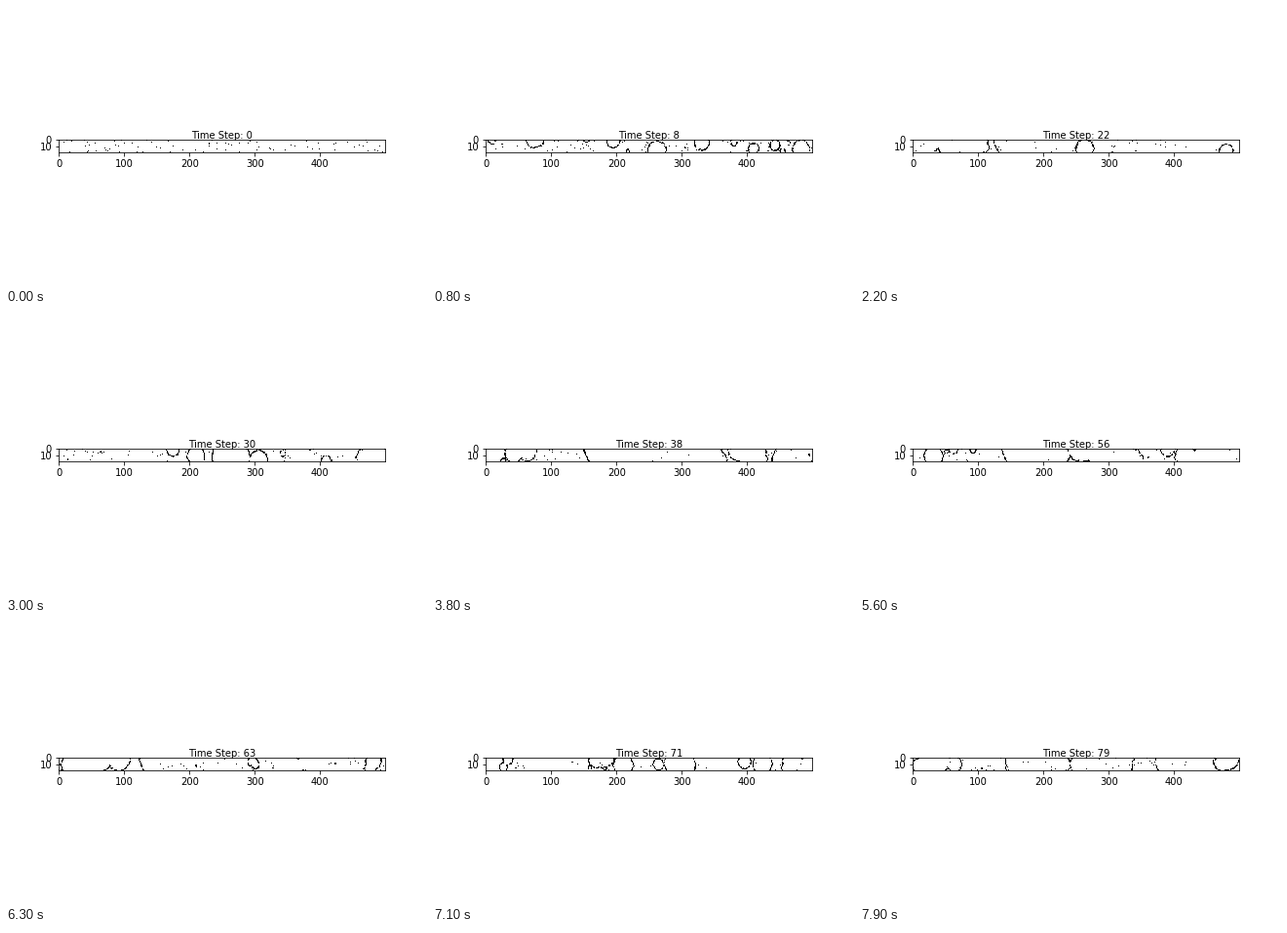
A matplotlib script for the animation above (8 s loop, 432x288 px).

```python
import matplotlib.pyplot as plt
import numpy as np
from matplotlib.animation import FuncAnimation

ROWS, COLS, STEPS = 20, 500, 80
REST = 10          # steps a cell stays quiet after firing
REACH = 2          # a cell senses the square this far around it
THRESHOLD = 3      # neighbours in the front needed to join it
P_FIRE = 0.016     # chance that a rested cell fires alone
TRIES = 2          # places tried per step for a new wave


def count_near(front):
    """Number of front cells in the square around each cell."""
    pad = np.pad(front.astype(int), REACH)
    size = 2 * REACH + 1
    return sum(pad[dy:dy + ROWS, dx:dx + COLS]
               for dy in range(size) for dx in range(size))


def simulate():
    """Excitable medium: lone sparks, plus rings growing from small nuclei."""
    rng = np.random.default_rng(7)
    last = np.full((ROWS, COLS), -REST - 1)
    front = np.zeros((ROWS, COLS), bool)
    history = []
    for step in range(STEPS):
        rested = step - last > REST
        front = rested & (count_near(front) >= THRESHOLD)
        if step > 0:
            for _ in range(TRIES):
                y, x = rng.integers(ROWS), rng.integers(COLS)
                nucleus = np.s_[max(y - 1, 0):y + 2, max(x - 1, 0):x + 2]
                front[nucleus] |= rested[nucleus]
        sparks = rested & (rng.random(front.shape) < P_FIRE)
        fired = front | sparks
        last[fired] = step
        history.append(fired)
    return history


history = simulate()

plt.rcParams.update({"font.family": "DejaVu Sans", "font.size": 10,
                     "text.kerning_factor": 6})
fig = plt.figure(figsize=(6, 4), dpi=72, facecolor="white")
fig.subplots_adjust(left=0.125, right=0.9, bottom=0.125, top=0.88)
ax = fig.add_subplot()
image = ax.imshow(history[0], cmap="binary", vmin=0, vmax=1,
                  interpolation="nearest")
ax.set_xticks(range(0, COLS, 100))
ax.set_yticks([0, 10])
title = ax.text(0.5, 1.05, "", transform=ax.transAxes, ha="center")


def update(step):
    image.set_data(history[step])
    title.set_text(f"Time Step: {step}")
    return image, title


anim = FuncAnimation(fig, update, frames=STEPS, interval=100, repeat=True,
                     repeat_delay=0)
plt.show()
```
